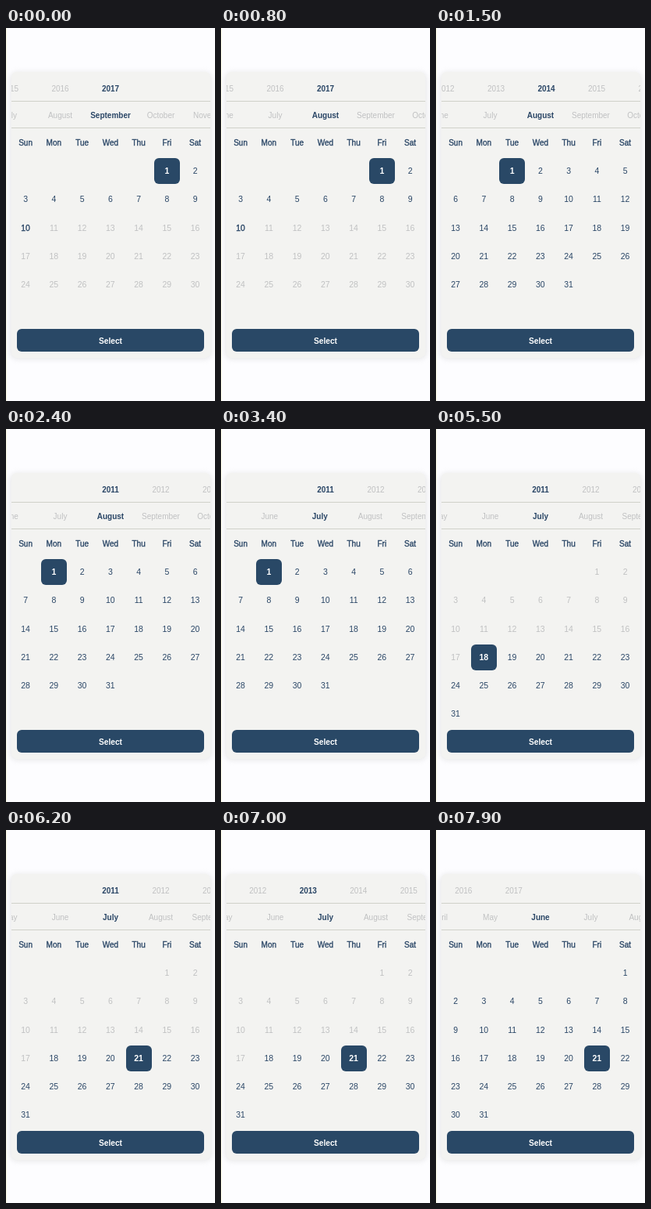
Recreate the animation shown at these times as an HTML page. Size 268 by 476 pixels, loop 8 s.

```html
<!DOCTYPE html>
<html lang="en">
<head>
<meta charset="utf-8">
<title>Date picker</title>
<style>
  html, body { margin: 0; width: 100%; height: 100%; overflow: hidden; background: #fdfdff; }
  svg { display: block; width: 100vw; height: 100vh; }
  text { font: 10px "Liberation Sans", Arial, sans-serif; text-anchor: middle; fill: #2a4666; }
  #grid text { font-size: 10.5px; }
  .off { fill: #c0c1c2; }
  .bold { font-weight: bold; }
  .medium { stroke: #2a4666; stroke-width: .35px; }
  text.light { fill: #fff; font-weight: bold; font-size: 10.2px; }
  .shadow { filter: blur(3px); }
</style>
</head>
<body>
<svg id="stage" viewBox="0 0 268 476">
  <defs><clipPath id="inside"><rect x="7" y="56" width="255" height="365"/></clipPath></defs>
  <rect width="268" height="476" fill="#fdfdff"/>
  <rect width="1" height="476" fill="#faf9e4"/>
  <rect class="shadow" x="5" y="56" width="259" height="367" rx="9" fill="#e9e9ea"/>
  <rect x="7" y="56" width="255" height="365" rx="7" fill="#f3f3f1"/>
  <path d="M7 93.5H262M7 127.5H262" stroke="#d0d1ca"/>
  <g id="lists" clip-path="url(#inside)"></g>
  <rect id="mark" width="33" height="33" rx="6" fill="#294866"/>
  <g id="grid"></g>
  <rect x="14" y="384" width="240" height="29" rx="6" fill="#294866"/>
  <text class="light" x="134" y="402.6">Select</text>
</svg>
<script>
const LOOP = 8000, CENTER = 134, STEP = 64.5, CELL = 36.25, SETTLE = 100;
const TAP = { at: 6000, day: 21 };
const FIRST_DATE = new Date(2011, 6, 18), LAST_DATE = new Date(2017, 8, 10);
const MONTHS = ["January", "February", "March", "April", "May", "June", "July",
  "August", "September", "October", "November", "December"];
const WEEK = ["Sun", "Mon", "Tue", "Wed", "Thu", "Fri", "Sat"];
const YEARS = Array.from({ length: 7 }, (_, i) => 2011 + i);

const swipe = (at, to, time = 500) => ({ at, to, time });
const yearWheel = {
  from: 2017,
  swipes: [swipe(988, 2011, 1000), swipe(6681, 2017, 750), swipe(7550, 2017.53, 350)]
};
const monthWheel = {
  from: 8,
  swipes: [swipe(250, 7), swipe(3005, 6), swipe(4200, 5.5, 600), swipe(4800, 6), swipe(7350, 5)]
};

const byId = id => document.getElementById(id);
const columnX = i => 25.1 + CELL * i;
const rowY = i => 182.4 + CELL * i;
const clamp = (v, lo, hi) => Math.max(lo, Math.min(hi, v));
const smooth = u => u * u * (3 - 2 * u);

function addText(parent, label, x, y, cls = "") {
  const el = document.createElementNS("http://www.w3.org/2000/svg", "text");
  el.textContent = label;
  el.setAttribute("x", x);
  el.setAttribute("y", y);
  el.setAttribute("class", cls);
  parent.append(el);
  return el;
}

const positionAt = (wheel, t) => wheel.swipes.reduce(
  (pos, s) => pos + (s.to - pos) * smooth(clamp((t - s.at) / s.time, 0, 1)), wheel.from);

// Value of the last swipe that has come to rest
const settledAt = (wheel, t) => Math.round(wheel.swipes.reduce(
  (pos, s) => t >= s.at + s.time + SETTLE ? s.to : pos, wheel.from));

function makeList(labels, y, base, wheel) {
  const items = labels.map(label => addText(byId("lists"), label, 0, y));
  return t => {
    const pos = positionAt(wheel, t) - base;
    items.forEach((el, i) => {
      const d = i - pos;
      el.setAttribute("x", CENTER + d * STEP);
      el.setAttribute("class", Math.abs(d) < .5 ? "bold" : "off");
    });
  };
}

const drawYears = makeList(YEARS, 81.1, YEARS[0], yearWheel);
const drawMonths = makeList(MONTHS, 115.1, 0, monthWheel);
WEEK.forEach((name, i) => addText(byId("stage"), name, columnX(i), 150, "medium"));

function dayClass(date, picked) {
  if (picked) return "light";
  if (date < FIRST_DATE || date > LAST_DATE) return "off";
  return +date === +LAST_DATE ? "medium" : "";
}

let shown = "";
function drawPage(t) {
  const year = clamp(settledAt(yearWheel, t), 2011, 2017);
  const month = settledAt(monthWheel, t);
  const tapped = t < TAP.at ? 1 : TAP.day;
  const key = [year, month, tapped].join();
  if (key === shown) return;
  shown = key;

  const first = new Date(year, month, 1);
  const count = new Date(year, month + 1, 0).getDate();
  const pick = Math.max(FIRST_DATE, new Date(year, month, tapped));
  byId("grid").replaceChildren();
  for (let day = 1; day <= count; day++) {
    const date = new Date(year, month, day);
    const slot = first.getDay() + day - 1;
    const x = columnX(slot % 7), y = rowY(Math.floor(slot / 7));
    const picked = +date === pick;
    addText(byId("grid"), day, x, y + 3.8, dayClass(date, picked));
    if (picked) {
      byId("mark").setAttribute("x", Math.round(x - 16.5));
      byId("mark").setAttribute("y", Math.round(y - 16.5));
    }
  }
}

const start = performance.now();
function frame() {
  const t = (performance.now() - start) % LOOP;
  drawYears(t);
  drawMonths(t);
  drawPage(t);
  requestAnimationFrame(frame);
}
frame();
</script>
</body>
</html>
```
